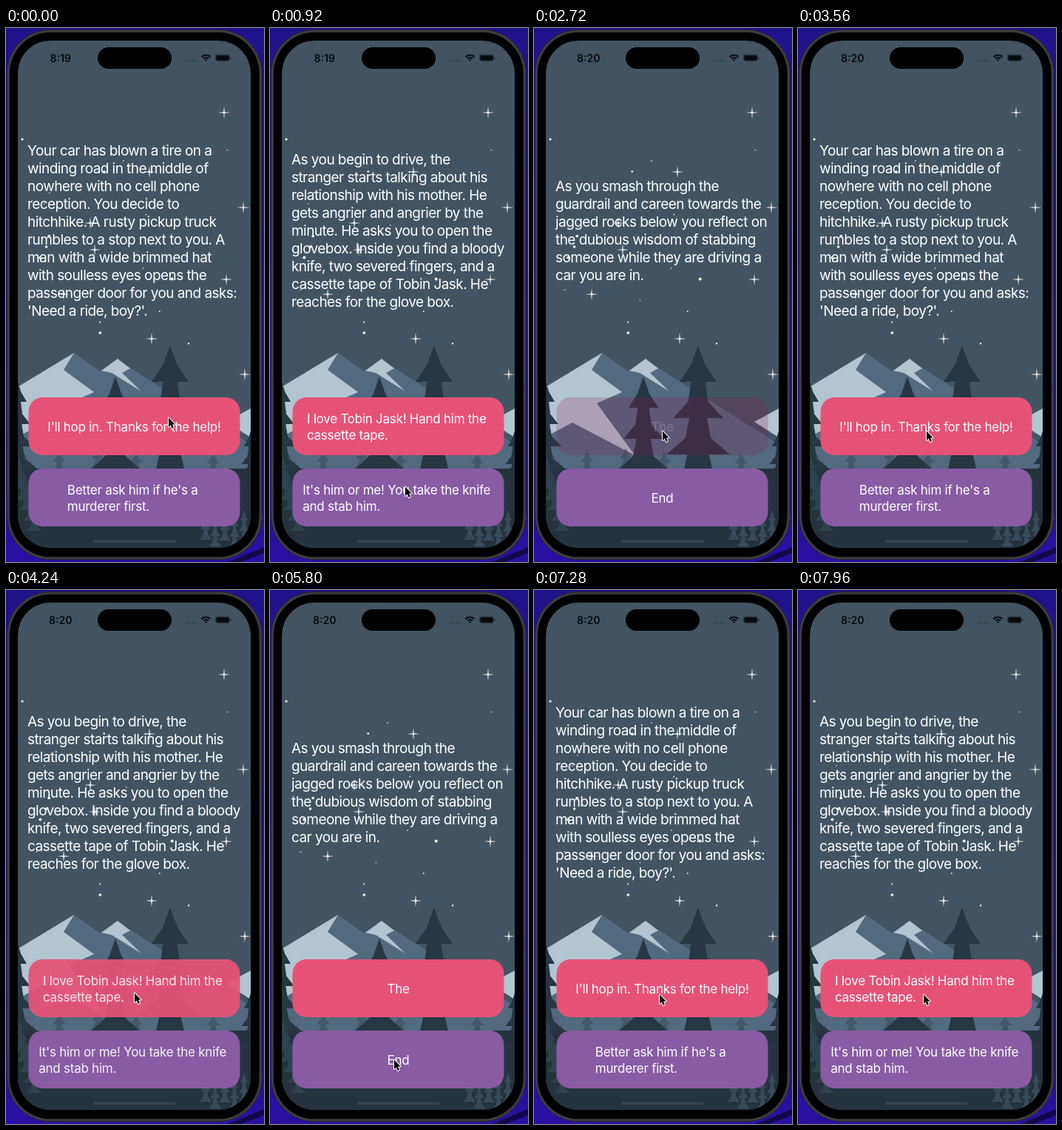
Animation of 349 by 720 pixels, one loop 8 s. Source, as an HTML page with a canvas:

```html
<!DOCTYPE html>
<html lang="en">
<head>
<meta charset="utf-8">
<title>Story game</title>
<style>
html, body { margin: 0; width: 100%; height: 100%; overflow: hidden; background: #20108c; }
canvas { display: block; width: 349px; height: 720px; }
</style>
</head>
<body>
<canvas id="stage"></canvas>
<script>
const W = 349, H = 720, LOOP = 8000, HOLD = 110, FADE = 360;
const FONT = 'Inter, Roboto, "Liberation Sans", sans-serif';
const SKY = '#425461', SNOW = '#b3c5d0', ROCK = '#526a80', TREE = '#273743', INK = '#07090b';
const PRESSED = '#8f0a4a';
const dpr = window.devicePixelRatio || 1;

const scenes = [
  {
    text: ['Your car has blown a tire on a', 'winding road in the middle of', 'nowhere with no cell phone',
      'reception. You decide to', 'hitchhike. A rusty pickup truck', 'rumbles to a stop next to you. A',
      'man with a wide brimmed hat', 'with soulless eyes opens the', 'passenger door for you and asks:',
      "'Need a ride, boy?'."],
    options: [
      { next: 1, lines: ["I'll hop in. Thanks for the help!"] },
      { next: 1, lines: ["Better ask him if he's a", 'murderer first.'] }
    ]
  },
  {
    text: ['As you begin to drive, the', 'stranger starts talking about his', 'relationship with his mother. He',
      'gets angrier and angrier by the', 'minute. He asks you to open the', 'glovebox. Inside you find a bloody',
      'knife, two severed fingers, and a', 'cassette tape of Tobin Jask. He', 'reaches for the glove box.'],
    options: [
      { next: 0, lines: ['I love Tobin Jask! Hand him the', 'cassette tape.'] },
      { next: 2, lines: ["It's him or me! You take the knife", 'and stab him.'] }
    ]
  },
  {
    text: ['As you smash through the', 'guardrail and careen towards the', 'jagged rocks below you reflect on',
      'the dubious wisdom of stabbing', 'someone while they are driving a', 'car you are in.'],
    options: [{ next: 0, lines: ['The'] }, { next: 0, lines: ['End'] }]
  }
];

const buttons = [{ y: 498, color: '#e65277' }, { y: 594, color: '#895ba3' }];

// Release time and button of each tap
const taps = [[240, 0], [1340, 1], [2800, 0], [3980, 0], [5240, 1], [6270, 1], [7480, 0]];

// Pointer moves: start, end, target
const moves = [
  [0, 1, 219, 524],
  [760, 920, 182, 617],
  [1800, 2300, 173, 542],
  [4420, 4900, 167, 632],
  [6620, 7000, 169, 544]
];

const clamp = v => Math.max(0, Math.min(1, v));
const easeOut = v => 1 - (1 - v) ** 2;
const smooth = v => v * v * (3 - 2 * v);

function randomizer(seed) {
  return () => (seed = seed * 16807 % 2147483647) / 2147483647;
}

function makeCanvas(canvas) {
  canvas.width = W * dpr;
  canvas.height = H * dpr;
  const c = canvas.getContext('2d');
  c.scale(dpr, dpr);
  return c;
}

function box(c, x, y, w, h, r, color) {
  c.beginPath();
  c.roundRect(x, y, w, h, r);
  c.fillStyle = color;
  c.fill();
}

function poly(c, color, ...p) {
  c.beginPath();
  for (let i = 0; i < p.length; i += 2) c.lineTo(p[i], p[i + 1]);
  c.closePath();
  c.fillStyle = color;
  c.fill();
}

function dot(c, x, y, r) {
  c.beginPath();
  c.arc(x, y, r, 0, 7);
  c.fill();
}

// Each tier flares out towards its lower edge
function tree(c, x, top, step, half, tiers, color) {
  for (let i = 0; i < tiers; i++) {
    const w = half * (1 + i * 0.36), y = top + step * (i + 1), neck = i ? w * 0.28 : 0;
    poly(c, color, x - neck, y - step, x + neck, y - step, x + w * 0.4, y - step * 0.45, x + w, y,
      x - w, y, x - w * 0.4, y - step * 0.45);
  }
}

function sparkle(c, x, y) {
  const p = [];
  for (let i = 0; i < 8; i++) {
    const r = i % 2 ? 1.1 : 8.5, a = i * Math.PI / 4;
    p.push(x + r * Math.cos(a), y + r * Math.sin(a));
  }
  poly(c, '#fff', ...p);
}

function drawPhone(c) {
  const g = c.createLinearGradient(0, 0, 0, H);
  g.addColorStop(0, '#20128a');
  g.addColorStop(1, '#2a0fa2');
  c.fillStyle = g;
  c.fillRect(0, 0, W, H);
  poly(c, '#110a48', W, 700, W, 708, 318, H, 300, H);
  const rims = ['#29292b', '#4a4a4c', '#2b2b2d', '#000'];
  rims.forEach((color, i) => {
    const d = i * 1.4;
    box(c, 1 + d, 2 + d, 345.5 - 2 * d, 715 - 2 * d, 59 - d, color);
  });
}

function drawMountains(c) {
  poly(c, ROCK, 16, 483, 92, 438, 127, 463, 150, 447, 331, 561, 331, 620, 16, 620);
  poly(c, SNOW, 16, 484, 92, 438, 78, 461, 119, 491, 85, 506, 137, 577, 16, 577);
  poly(c, SNOW, 129, 462, 151, 446, 168, 459, 157, 465, 183, 490, 143, 465);
  poly(c, SNOW, 331, 513, 298, 531, 331, 552);
  poly(c, ROCK, 16, 551, 52, 532, 138, 577, 16, 577);
}

function drawForest(c) {
  for (let i = 0; i < 7; i++) tree(c, 20 + i * 52, 566 + i * 5 % 9, 14, 9, 3, '#43586a');
  tree(c, 222, 428, 49, 25, 4, TREE);
  tree(c, 148, 470, 42, 20, 3, TREE);
  tree(c, 15, 474, 30, 13, 4, TREE);
  tree(c, 332, 540, 24, 10, 3, TREE);
  c.fillStyle = '#24333e';
  c.fillRect(16, 594, 315, 107);
  for (let i = 0; i < 5; i++) {
    tree(c, 18 + i * 5, 580 + i * 14, 14, 6, 3, '#30424f');
    tree(c, 270 + i * 13, 648 + i * 9 % 17, 14, 5, 3, '#374b5a');
  }
}

function drawStars(c) {
  const points = [[295, 114], [194, 194], [321, 242], [114, 263], [120, 299], [298, 339], [78, 359], [197, 419], [323, 467]];
  points.forEach(p => sparkle(c, ...p));
  const rnd = randomizer(29);
  c.fillStyle = '#fff';
  for (let i = 0; i < 20; i++) dot(c, 22 + rnd() * 304, 150 + i * 14.5, 0.7 + rnd() ** 2 * 1.3);
}

function drawScreen(c) {
  c.save();
  c.beginPath();
  c.roundRect(16, 17, 315, 684, 44);
  c.clip();
  c.fillStyle = SKY;
  c.fillRect(0, 0, W, H);
  drawMountains(c);
  drawForest(c);
  drawStars(c);
  box(c, 118, 690.5, 112, 3.5, 2, '#3a444d');
  c.restore();
}

function drawStatus(c) {
  box(c, 124, 26, 100, 29, 14.5, '#000');
  c.fillStyle = '#2b3740';
  for (let i = 0; i < 4; i++) dot(c, 244 + i * 4.4, 44, 1.1);
  c.strokeStyle = INK;
  c.lineWidth = 2;
  for (const r of [1.5, 5, 8.5]) {
    c.beginPath();
    c.arc(270.5, 45, r, -Math.PI * 0.75, -Math.PI * 0.25);
    c.stroke();
  }
  box(c, 283, 35.5, 20, 9.5, 3, '#29343d');
  box(c, 284.5, 37, 17, 6.5, 1.8, INK);
  box(c, 303.5, 38.5, 1.3, 3.5, 1, '#29343d');
}

const backdrop = document.createElement('canvas');
const back = makeCanvas(backdrop);
drawPhone(back);
drawScreen(back);
drawStatus(back);

const ctx = makeCanvas(document.getElementById('stage'));

function setFont(weight, size, spacing) {
  ctx.font = `${weight} ${size}px ${FONT}`;
  ctx.letterSpacing = spacing + 'px';
}

function drawStory(lines) {
  setFont(400, 19, -0.56);
  ctx.fillStyle = '#fff';
  lines.forEach((s, i) => ctx.fillText(s, 29, 292 + (i * 2 - lines.length) * 12));
}

// The block is centred as a whole; wrapped lines keep their trailing space
function drawTitle(lines, top) {
  setFont(400, 17, -0.25);
  ctx.fillStyle = '#fff';
  const last = lines.length - 1;
  const widths = lines.map((s, i) => ctx.measureText(i < last ? s + ' ' : s).width);
  const x = 173.5 - Math.max(...widths) / 2;
  lines.forEach((s, i) => ctx.fillText(s, x, top + 46 + (i * 2 - last) * 11));
}

function drawPointer(t) {
  let x = 0, y = 0;
  for (const [from, to, tx, ty] of moves) {
    const k = from ? smooth(clamp((t - from) / (to - from))) : 1;
    x += (tx - x) * k;
    y += (ty - y) * k;
  }
  ctx.save();
  ctx.translate(x, y);
  ctx.lineWidth = 2;
  ctx.lineJoin = 'round';
  ctx.strokeStyle = '#fff';
  poly(ctx, '#000', 1, 1.5, 1, 14, 3.8, 11.4, 5.8, 16, 7.9, 15.1, 6, 10.6, 9.6, 10.4);
  ctx.stroke();
  ctx.fill();
  ctx.restore();
}

function stateAt(t) {
  let scene = scenes[0], fade = 1, held = -1, tapped = -1;
  for (const [up, button] of taps) {
    if (t < up - HOLD) break;
    if (t < up) {
      held = button;
      break;
    }
    scene = scenes[scene.options[button].next];
    fade = easeOut(clamp((t - up) / FADE));
    tapped = button;
  }
  return { scene, fade, held, tapped };
}

function draw(t) {
  const { scene, fade, held, tapped } = stateAt(t);
  ctx.drawImage(backdrop, 0, 0, W, H);

  ctx.textAlign = 'center';
  setFont(600, 14, 0);
  ctx.fillStyle = INK;
  ctx.fillText(t < 1800 ? '8:19' : '8:20', 73.7, 45.5);
  ctx.textAlign = 'left';
  drawStory(scene.text);

  buttons.forEach((b, i) => {
    const alpha = i === held ? 0.2 : i === tapped ? 0.2 + 0.8 * fade : 1;
    ctx.globalAlpha = alpha;
    box(ctx, 30.5, b.y, 286, 78, 19, i === held ? PRESSED : b.color);
    ctx.globalAlpha = alpha * fade;
    drawTitle(scene.options[i].lines, b.y);
    ctx.globalAlpha = 1;
  });
  drawPointer(t);
}

const start = performance.now();
function tick() {
  draw((performance.now() - start) % LOOP);
  requestAnimationFrame(tick);
}
tick();
</script>
</body>
</html>
```
